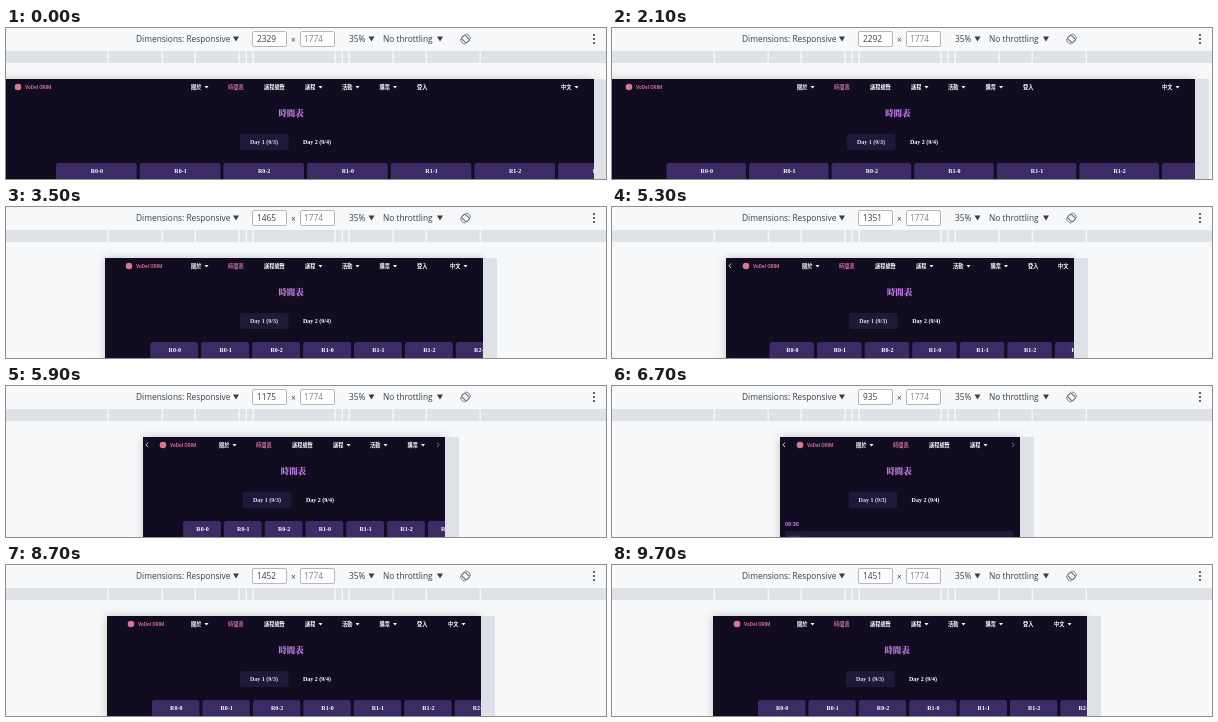
An HTML page that plays this animation: 600 px wide and 151 px high, repeating every 9.8 s.

```html
<!DOCTYPE html>
<html lang="zh-Hant">
<head>
<meta charset="utf-8">
<title>Responsive timetable</title>
<style>
html, body { margin: 0; width: 100%; height: 100%; overflow: hidden; background: #f6f8fa; }
svg { display: block; }
.tool { font: 8.35px "Open Sans", "Noto Sans", sans-serif; fill: #3c4043; }
.nav { font: 900 5.2px "Noto Sans CJK TC", "Noto Sans CJK", sans-serif; fill: #fff; }
.nav .on { fill: #c66c9c; }
.brand { font: bold 4.9px Roboto, sans-serif; fill: #c56a92; }
.head { font: 900 8.4px "Noto Serif CJK TC", "Noto Sans CJK TC", "Noto Sans CJK", serif; fill: #c986f0; stroke: #c986f0; stroke-width: .2; text-anchor: middle; }
.label { font: bold 6px "Liberation Serif", serif; fill: #fff; text-anchor: middle; }
.soft { fill: #e0dbee; }
.time { font: bold 5.4px Roboto, sans-serif; fill: #c07be8; }
.glow { filter: drop-shadow(0 0 5px #0003); }
</style>
</head>
<body>
<svg id="stage" width="600" height="151" viewBox="0 0 600 151">
  <rect width="600" height="151" fill="#f6f8fa"/>
  <g class="tool">
    <text x="130" y="14">Dimensions: Responsive</text>
    <text x="343" y="14">35%</text>
    <text x="377" y="14">No throttling</text>
    <text x="285" y="14.5">×</text>
    <g fill="#fff" stroke="#b4b7bc">
      <rect x="246.5" y="3.5" width="34" height="15" rx="1.5"/>
      <rect x="294.5" y="3.5" width="34" height="15" rx="1.5"/>
    </g>
    <text id="size" x="251" y="14"></text>
    <text x="298" y="14" fill="#80868b">1774</text>
    <path d="M227 8.5h6l-3 5zM362.5 8.5h6l-3 5zM431 8.5h6l-3 5z"/>
    <g fill="none" stroke="#5f6368">
      <rect x="457" y="7.5" width="5" height="7" rx=".8" transform="rotate(-45 459.5 11)"/>
      <path d="M459.5 6a5 5 0 0 1 5 5M459.5 16a5 5 0 0 1-5-5" stroke-width=".8"/>
    </g>
    <circle cx="588" cy="7" r="1.1"/><circle cx="588" cy="11" r="1.1"/><circle cx="588" cy="15" r="1.1"/>
  </g>
  <rect y="23" width="600" height="12" fill="#dee1e6"/>
  <g id="marks"></g>
  <g id="page"></g>
</svg>
<script>
const LOOP = 9800, STEP = 100, MID = 288, SCALE = 0.2577;
// [ms, viewport width]
const WIDTHS = [[0, 2329], [1700, 2329], [2100, 2292], [2700, 1990], [3500, 1465], [3700, 1458],
  [4700, 1385], [5300, 1351], [5700, 1235], [6700, 935], [7700, 1297], [7800, 1323],
  [8700, 1452], [9100, 1530], [9700, 1451]];
// [ms, how much wider the content is still laid out than the viewport]
const LAGS = [[0, 0], [1800, 0], [2100, 8], [3500, 0], [4700, 0], [5300, 25], [6700, 20], [7700, 0]];
const MENU = [["關於", 0, 1], ["時間表", 37, 0], ["議程總覽", 73, 0], ["議程", 114, 1],
  ["活動", 151, 1], ["購票", 188.5, 1], ["登入", 226, 0]];
const ROOMS = ["R0-0", "R0-1", "R0-2", "R1-0", "R1-1", "R1-2", "R2-0"];

const byId = id => document.getElementById(id);

function at(keys, t) {
  const i = keys.findIndex(k => k[0] >= t);
  if (i < 1) return keys[i < 0 ? keys.length - 1 : 0][1];
  const [t0, a] = keys[i - 1], [t1, b] = keys[i];
  return a + (b - a) * (t - t0) / (t1 - t0);
}

const text = (x, y, s, cls = "") => `<text x="${x}" y="${y}" class="${cls}">${s}</text>`;
const rect = (x, y, w, h, fill, r = 0, cls = "") =>
  `<rect x="${x}" y="${y}" width="${w}" height="${h}" rx="${r}" fill="${fill}" class="${cls}"/>`;
const caret = x => `<path d="M${x} 58h4l-2 2.6z"/>`;
const chevron = (x, dir, color) =>
  `<path d="M${x + dir} 56.5l${-2 * dir} 2.3l${2 * dir} 2.3" fill="none" stroke="${color}" stroke-width=".8"/>`;
// Nested viewport that keeps stage coordinates and clips its content
const clip = (x, y, w, h, body) =>
  `<svg x="${x}" y="${y}" width="${w}" height="${h}" viewBox="${x} ${y} ${w} ${h}">${body}</svg>`;

function header(width, left, right) {
  const narrow = width < 1400, cut = width < 1340;
  const x0 = Math.max(185, left + 76);
  const lang = Math.max(right - 33, x0 + 256);
  const logo = left + (narrow ? 16.5 : 20.5);
  const items = MENU.map(([s, dx, drop]) =>
    text(x0 + dx, 61, s, s === "時間表" ? "on" : "") + (drop ? caret(x0 + dx + 13.5) : "")).join("");
  const edge = right - (cut ? 15 : narrow ? 4 : 0);
  return `<circle cx="${logo + 3.5}" cy="59" r="3.3" fill="#d9788f"/>` +
    text(logo + 10.5, 61, "VoDel ORIM", "brand") +
    `<g class="nav">` +
    clip(left, 51, edge - left, 16, items + text(lang, 61, "中文") + caret(lang + 13.5)) + `</g>` +
    (narrow ? chevron(left + 4, 1, "#fff") : "") +
    (cut ? chevron(right - 7, -1, "#8c86a0") : "");
}

function timetable(layout, left, w) {
  if (layout < 1024) {
    return text(left + 5, 140, "08:30", "time") +
      rect(left + 5, 145, w - 12, 20, "#211939", 2) + rect(left + 8, 149.5, 13, 6, "#3c2b65", 1);
  }
  const pitch = layout * 0.0379 - 4.6;
  const start = left + 45 + (layout - 1451) * 0.0194;
  return ROOMS.map((name, i) => {
    const x = start + i * pitch;
    return rect(x, 135, pitch - 3, 30, "#3c2b65", 2.5) + text(x + pitch / 2 - 1, 145, name, "label");
  }).join("");
}

function draw(t) {
  const width = Math.round(at(WIDTHS, t)), lag = at(LAGS, t);
  const left = Math.round(MID - width * SCALE / 2);
  const right = Math.round(MID + width * SCALE / 2);
  const w = right - left, shift = lag * SCALE / 2;
  byId("size").textContent = width;
  byId("page").innerHTML =
    rect(left, 51, w, 110, "#110c20", 0, "glow") +
    rect(right, 51, 14, 100, "#dee1e6") +
    clip(left, 51, w, 100,
      header(width, left, right) +
      text(285 + shift * 0.8, 88, "時間表", "head") +
      rect(234 + shift, 106, 48.5, 16, "#1f1939", 2) +
      text(258 + shift, 116, "Day 1 (9/3)", "label soft") +
      text(311 + shift, 116, "Day 2 (9/4)", "label") +
      timetable(width + lag, left, w));
}

byId("marks").innerHTML = [320, 375, 425, 768, 1024, 1440].map(b =>
  [-1, 1].map(side => rect(Math.round(MID + side * b * SCALE / 2) - 0.5, 23, 1.5, 12, "#f4f6f8")).join("")).join("");

const begin = performance.now();
let shown = -1;
function tick() {
  const t = Math.floor((performance.now() - begin) % LOOP / STEP) * STEP;
  if (t !== shown) draw(shown = t);
  requestAnimationFrame(tick);
}
tick();
</script>
</body>
</html>
```
